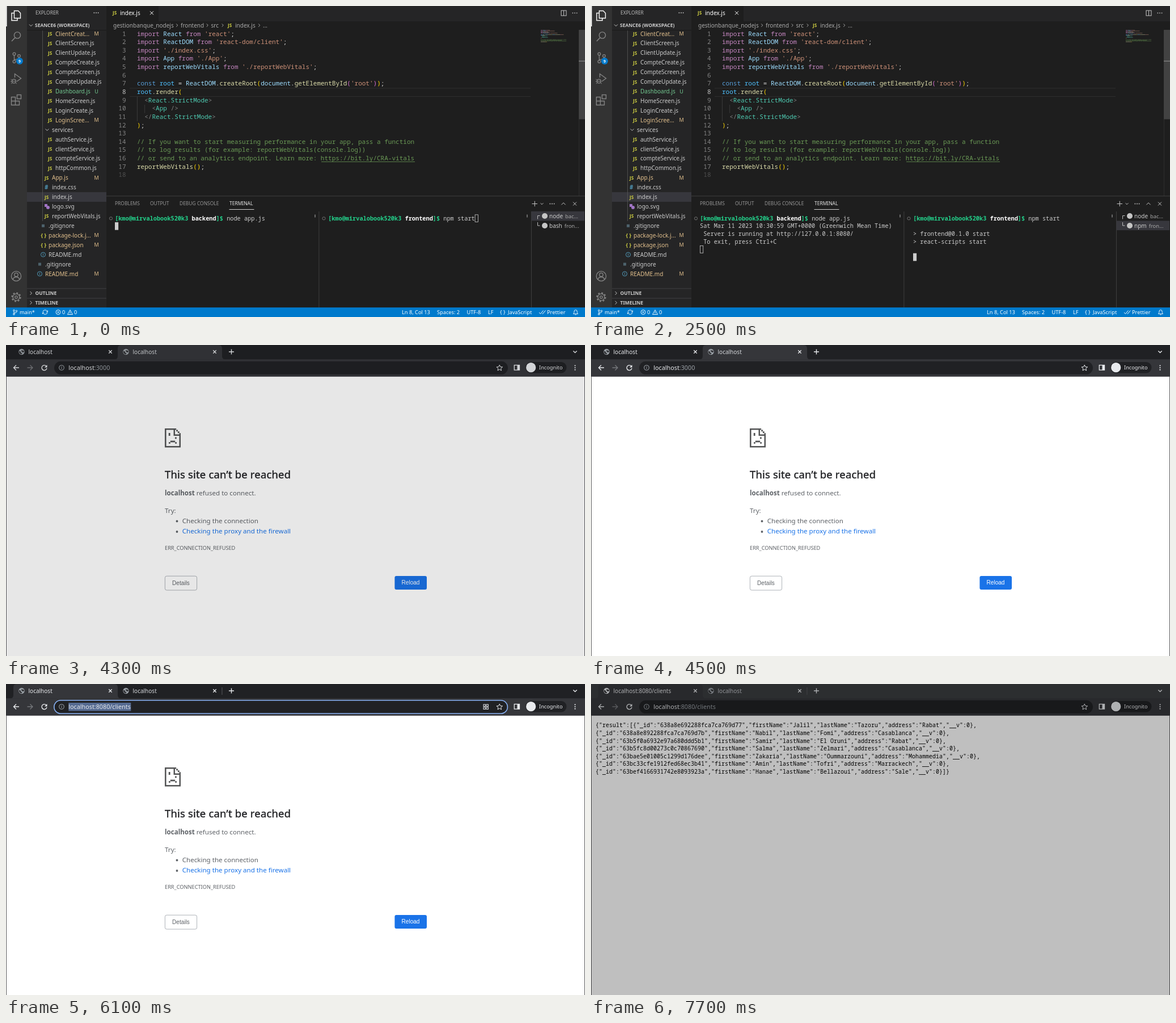
An HTML page for the animation above (8 s loop, 1021 px wide and 548 px high).

```html
<!DOCTYPE html>
<html lang="en">
<head>
<meta charset="utf-8">
<title>Starting backend and frontend</title>
<style>
html, body { margin: 0; width: 100%; height: 100%; overflow: hidden; background: #1e1e1e; }
svg { display: block; width: 1021px; height: 548px; font-family: "Noto Sans", sans-serif; }
text { white-space: pre; }
.mono { font-family: "Noto Sans Mono", monospace; }
.sans { font-family: "Liberation Sans", Arial, sans-serif; }
.b { font-weight: 700; }
.medium { stroke: #202124; stroke-width: .4px; letter-spacing: .2px; }
.mid { text-anchor: middle; }
.end { text-anchor: end; }
</style>
</head>
<body>
<svg id="stage" viewBox="0 0 1021 548" xmlns="http://www.w3.org/2000/svg"></svg>
<script>
const LOOP = 8000;
const GREY = '#cccccc', DIM = '#858585', ICON = '#c5c5c5';

// drawing helpers
const esc = s => s.replace(/&/g, '&amp;').replace(/</g, '&lt;').replace(/>/g, '&gt;');
const span = (s, fill, more = '') => `<tspan fill="${fill}" ${more}>${esc(s)}</tspan>`;
const rawText = (x, y, inner, fill, size, cls = '') =>
  `<text x="${x}" y="${y}" fill="${fill}" font-size="${size}" class="${cls}">${inner}</text>`;
const text = (x, y, s, fill = GREY, size = 10, cls = '') => rawText(x, y, esc(s), fill, size, cls);
const rect = (x, y, w, h, fill, more = '') =>
  `<rect x="${x}" y="${y}" width="${w}" height="${h}" fill="${fill}" ${more}/>`;
const path = (d, stroke = ICON, w = 1, more = '') =>
  `<path d="${d}" fill="none" stroke="${stroke}" stroke-width="${w}" ${more}/>`;
const shape = (d, fill) => `<path d="${d}" fill="${fill}"/>`;
const disc = (x, y, r, fill) => `<circle cx="${x}" cy="${y}" r="${r}" fill="${fill}"/>`;
const ring = (x, y, r, stroke = ICON, w = 1, more = '') =>
  `<circle cx="${x}" cy="${y}" r="${r}" fill="none" stroke="${stroke}" stroke-width="${w}" ${more}/>`;
const cross = (x, y, r, c = ICON, w = 1) =>
  path(`M${x - r} ${y - r}l${2 * r} ${2 * r}m0 ${-2 * r}l${-2 * r} ${2 * r}`, c, w);
const chevron = (x, y, turn, c = ICON, r = 3, w = 1) =>
  path(`M${-r} ${-r / 2}L0 ${r / 2}L${r} ${-r / 2}`, c, w, `transform="translate(${x} ${y}) rotate(${turn})"`);
const dots = (x, y, dx, dy, c = ICON, r = 0.9) =>
  [-1, 0, 1].map(i => disc(x + i * dx, y + i * dy, r, c)).join('');
const info = (x, y, r, c, w = 1) => ring(x, y, r, c, w)
  + path(`M${x} ${y - 0.6}v${r * 0.6}M${x} ${y - r * 0.55}v${r * 0.25}`, c, w);
const during = (from, to, ...parts) => `<g data-from="${from}" data-to="${to}">${parts.join('')}</g>`;

// ---------- editor window ----------
const INK = {
  k: '#c586c0', b: '#569cd6', v: '#9cdcfe', s: '#ce9178', f: '#dcdcaa', o: '#4fc1ff', t: '#4ec9b0',
  p: '#808080', w: '#d4d4d4', g: '#ffd700', m: '#da70d6', c: '#6a9955'
};
// each ~x switches to ink x
const CODE = [
  "~kimport ~vReact ~kfrom ~s'react'~w;",
  "~kimport ~vReactDOM ~kfrom ~s'react-dom/client'~w;",
  "~kimport ~s'./index.css'~w;",
  "~kimport ~vApp ~kfrom ~s'./App'~w;",
  "~kimport ~vreportWebVitals ~kfrom ~s'./reportWebVitals'~w;",
  "",
  "~bconst ~oroot ~w= ~vReactDOM~w.~fcreateRoot~g(~vdocument~w.~fgetElementById~m(~s'root'~m)~g)~w;",
  "~oroot~w.~frender~g(",
  "~w  ~p<~tReact.StrictMode~p>",
  "~w    ~p<~tApp ~p/>",
  "~w  ~p</~tReact.StrictMode~p>",
  "~g)~w;",
  "",
  "~c// If you want to start measuring performance in your app, pass a function",
  "~c// to log results (for example: reportWebVitals(console.log))",
  "~c// or send to an analytics endpoint. Learn more: https://bit.ly/CRA-vitals",
  "~freportWebVitals~g()~w;",
  ""
].map(s => s.split('~').slice(1).map(p => [INK[p[0]], p.slice(1)]));

const FILES = [
  [87, 'js', 'ClientCreat...', 'M'], [87, 'js', 'ClientScreen.js'], [87, 'js', 'ClientUpdate.js'],
  [87, 'js', 'CompteCreate.js'], [87, 'js', 'CompteScreen.js'], [87, 'js', 'CompteUpdate.js'],
  [87, 'js', 'Dashboard.js', 'U'], [87, 'js', 'HomeScreen.js'], [87, 'js', 'LoginCreate.js'],
  [87, 'js', 'LoginScree...', 'M'], [81, 'dir', 'services'], [87, 'js', 'authService.js'],
  [87, 'js', 'clientService.js'], [87, 'js', 'compteService.js'], [87, 'js', 'httpCommon.js'],
  [81, 'js', 'App.js', 'M'], [81, 'css', 'index.css'], [81, 'js', 'index.js'], [81, 'svg', 'logo.svg'],
  [81, 'js', 'reportWebVitals.js'], [75, 'git', '.gitignore'], [75, 'json', 'package-lock.j...', 'M'],
  [75, 'json', 'package.json', 'M'], [75, 'info', 'README.md'], [69, 'git', '.gitignore'],
  [69, 'info', 'README.md', 'M']
];
const jsIcon = (x, y) => text(x, y + 3, 'JS', '#cbcb41', 8.3, 'b');
const FILE_ICON = {
  js: jsIcon,
  dir: (x, y) => chevron(x + 4.5, y, 0),
  css: (x, y) => text(x, y + 3.6, '#', '#519aba', 10, 'b'),
  json: (x, y) => text(x - 0.5, y + 3, '{ }', '#cbcb41', 9, 'b'),
  info: (x, y) => info(x + 3.5, y, 4, '#519aba'),
  git: (x, y) => rect(x + 1, y - 2.5, 5, 5, '#4d626c'),
  svg: (x, y) => rect(x, y - 4.5, 5, 5, '#a074c4') + disc(x + 6, y + 1.5, 3, '#a074c4')
};
const STATUS_INK = { M: '#e2c08d', U: '#73c991' };

function activityBar() {
  return rect(0, 0, 37, 532, '#333333') + rect(0, 0, 1.5, 36, '#fff')
    + path('M14.5 8.5h7l4 4v9h-11zM14.5 12.5h-4.5v13h10v-4', '#fff', 1.4)
    + ring(20, 51.5, 5.6, DIM, 1.4) + path('M16 55.7L10 62', DIM, 1.6)
    + ring(14.5, 84.5, 2.3, DIM, 1.3) + ring(23, 88, 2.3, DIM, 1.3) + ring(14.5, 98, 2.3, DIM, 1.3)
    + path('M14.5 87v8.6M23 90.5q-.5 3.5-8 4', DIM, 1.3)
    + disc(24, 97, 6, '#007acc') + text(24, 99.6, '9', '#fff', 7, 'b mid')
    + path('M15.5 126v-6.5L26.5 127.5L19 133', DIM, 1.4) + ring(14, 132.5, 3.4, DIM, 1.3)
    + path('M8.5 129l3 2M8 133h3M9 137l2.5-2M19 137l-2.5-2M10.5 132.5h7', DIM, 1)
    + path('M9.5 160.5h7v14h-7zM9.5 167.5h14v7h-14z', DIM, 1.4)
    + rect(19.5, 156.5, 7, 7, 'none', `stroke="${DIM}" stroke-width="1.4"`)
    + ring(18, 476, 8.6, DIM, 1.3) + ring(18, 473.5, 3.2, DIM, 1.3)
    + path('M12 482q1.5-4.5 6-4.5t6 4.5', DIM, 1.3)
    + ring(18, 513, 5.8, DIM, 1.3) + ring(18, 513, 2.2, DIM, 1.3)
    + ring(18, 513, 7.5, DIM, 2.2, 'stroke-dasharray="2.9 2.99"');
}

function sidebar() {
  const rows = FILES.map(([x, icon, name, mark], i) => {
    const y = 48.9 + i * 16.92;
    const ink = STATUS_INK[mark] || GREY;
    return FILE_ICON[icon](x - 13, y) + text(x, y + 3.6, name, ink)
      + (mark ? text(159.5, y + 3.2, mark, ink, 9, 'mid') : '');
  }).join('');
  return rect(37, 0, 140, 532, '#252526') + rect(37, 328, 140, 17, '#37373d')
    + rect(64, 42, 0.8, 337, '#585858') + rows
    + text(52, 15, 'EXPLORER', '#bbbbbb', 8.46) + dots(159, 12, 3.6, 0)
    + chevron(44, 34, 0) + text(51, 37.1, 'SEANCE6 (WORKSPACE)', GREY, 8.46, 'b')
    + rect(37, 42, 140, 1.2, '#1b1b1c')
    + rect(37, 497.5, 140, 0.8, '#48484a') + rect(37, 514.6, 140, 0.8, '#48484a')
    + chevron(44, 506, -90) + text(51.5, 509.2, 'OUTLINE', GREY, 8.46, 'b')
    + chevron(44, 522.8, -90) + text(51.5, 526, 'TIMELINE', GREY, 8.46, 'b');
}

function editor() {
  const lineH = 14.63, faint = '#a9a9a9';
  let out = rect(177, 0, 844, 27, '#252526') + rect(177, 0, 92, 27, '#1e1e1e')
    + jsIcon(188, 12) + text(201, 15.6, 'index.js', '#fff') + cross(257, 12.3, 3, '#fff')
    + rect(979, 8, 9, 9, 'none', `stroke="${ICON}"`) + path('M983.5 8v9') + dots(1003, 12.3, 3.6, 0)
    + text(189, 37.6, 'gestionbanque_nodejs', faint) + chevron(301.5, 34, -90, faint, 2.6)
    + text(308, 37.6, 'frontend', faint) + chevron(355, 34, -90, faint, 2.6)
    + text(361.5, 37.6, 'src', faint) + chevron(382, 34, -90, faint, 2.6)
    + jsIcon(391, 34) + text(404, 37.6, 'index.js', faint) + chevron(446.5, 34, -90, faint, 2.6)
    + text(453, 37.6, '...', faint)
    + rect(218, 144.5, 707, 0.9, '#303030') + rect(218, 159, 707, 0.9, '#303030')
    + rect(231, 159.5, 0.8, 43.5, '#404040') + rect(244.3, 174, 0.8, 14.6, '#404040')
    + rect(556, 274, 165, 0.8, INK.c);
  CODE.forEach((tokens, i) => {
    const y = +(52.6 + i * lineH).toFixed(2);
    const ink = i === 7 ? '#c6c6c6' : i === 17 ? '#505050' : DIM;
    out += text(211.5, y, String(i + 1), ink, 11.03, 'mono end');
    out += rawText(231, y, tokens.map(([c, s]) => span(s, c)).join(''), GREY, 11.03, 'mono');
    let col = 0;
    for (const [c, s] of tokens) {
      for (const word of s.matchAll(/\S+/g))
        out += rect(943 + (col + word.index) * 0.61, 42.3 + i * 1.27, word[0].length * 0.61, 0.9, c, 'opacity=".5"');
      col += s.length;
    }
  });
  return out + rect(1010, 42, 0.7, 293, '#343434')
    + during(0, 4100, rect(1010, 42, 11, 157.5, '#424242'))
    + rect(1010, 96.5, 11, 1.2, '#8c8c8c');
}

const CELL = 6.16, TERM = 10.27, ROW = 13.65;
const termLine = (x, row, s) => text(x, 377.6 + row * ROW, s, GREY, TERM, 'mono');
const prompt = (x, dir, cmd) => rawText(x, 377.6,
  span('[kmo@mirvalobook520k3 ', '#23d18b', 'class="b"') + span(dir, '#ffffff', 'class="b"')
  + span(']$', '#23d18b', 'class="b"') + span(' ' + cmd, GREY), GREY, TERM, 'mono');
function cursor(x, col, row, solid) {
  const left = x + col * CELL, top = 367.4 + row * ROW;
  return solid ? rect(left, top, CELL, 13.6, GREY)
    : rect(left + 0.4, top + 0.4, CELL - 0.8, 12.8, 'none', `stroke="${GREY}" stroke-width=".8"`);
}
const termTab = (y, name, where) => disc(950, y, 5, ICON)
  + rawText(958, y + 3.6, esc(name) + span(where, '#a8a8a8', 'dx="4" font-size="9.4"'), GREY, 10);

function panel() {
  const L = 192, R = 568, faint = '#969696';
  const row = (from, to, y) => during(from, to, rect(926.5, y, 93.5, 16.6, '#37373d'));
  return rect(177, 334.5, 844, 0.8, '#474747')
    + text(192, 351.2, 'PROBLEMS', faint, 8.46) + text(254, 351.2, 'OUTPUT', faint, 8.46)
    + text(306, 351.2, 'DEBUG CONSOLE', faint, 8.46) + text(394, 351.2, 'TERMINAL', '#e7e7e7', 8.46)
    + rect(393.5, 358, 44, 0.9, '#e7e7e7')
    + path('M927.5 348.5h9.5M932.3 343.7v9.5') + chevron(945, 348.5, 0, ICON, 2.4)
    + dots(963, 348.5, 3.6, 0) + chevron(983, 348.5, 180, ICON, 3.6) + cross(1003, 348.5, 3)
    + rect(551.5, 362, 0.8, 169, '#474747') + rect(926, 362, 0.8, 169, '#474747')
    + rect(544, 367.5, 2, 5, '#6a6a6a') + rect(918, 367.5, 2, 5, '#6a6a6a')
    + ring(185, 374.3, 2.6, '#7a7a7a', 0.9) + ring(560.5, 374.3, 2.6, '#7a7a7a', 0.9)
    + prompt(L, 'backend', 'node app.js') + prompt(R, 'frontend', 'npm start')
    + during(0, 1100, cursor(L, 0, 1, true))
    + during(1100, LOOP,
      termLine(L, 1, 'Sat Mar 11 2023 10:30:59 GMT+0000 (Greenwich Mean Time)'),
      termLine(L, 2, ' Server is running at http://127.0.0.1:8080/'),
      termLine(L, 3, ' To exit, press Ctrl+C'))
    + during(1100, 1300, cursor(L, 0, 4, true)) + during(1300, LOOP, cursor(L, 0, 4, false))
    + during(0, 1300, cursor(R, 42, 0, false)) + during(1300, 1900, cursor(R, 42, 0, true))
    + during(1900, 2500, cursor(R, 0, 1, true))
    + during(2500, LOOP, termLine(R, 2, '> frontend@0.1.0 start'),
      termLine(R, 3, '> react-scripts start'), cursor(R, 0, 5, true))
    + row(0, 1300, 361.8) + row(1300, LOOP, 378.5)
    + path('M937.5 375.5v-6h4M937.5 381v6h4', GREY, 0.9)
    + termTab(370, 'node', 'bac...')
    + during(0, 1900, termTab(387, 'bash', 'fron...'))
    + during(1900, 2100, termTab(387, 'node', 'fron...'))
    + during(2100, LOOP, termTab(387, 'npm', 'fron...'));
}

function statusBar() {
  const w = '#fff', label = (x, s) => text(x, 542.6, s, w, 9.23);
  return rect(0, 531.2, 1021, 16.8, '#007acc')
    + ring(14, 536.5, 1.3, w, 0.9) + ring(14, 543, 1.3, w, 0.9) + ring(18.5, 537.5, 1.3, w, 0.9)
    + path('M14 538v4M18.5 539q0 2-4.5 2', w, 0.9) + label(24, 'main*')
    + path('M65 539a4 4 0 0 1 7.6-1M73 540a4 4 0 0 1-7.6 1M73.5 536.5v2.5h-2.5M64.5 542.8v-2.5h2.5', w, 0.9)
    + ring(92, 539.5, 4, w, 0.9) + cross(92, 539.5, 1.7, w, 0.9) + label(99, '0')
    + path('M113 535.5l4.5 8h-9zM113 538.5v2.5M113 541.8v.8', w, 0.9) + label(120, '0')
    + label(698, 'Ln 8, Col 13') + label(760, 'Spaces: 2') + label(812.5, 'UTF-8') + label(850, 'LF')
    + text(871, 542.8, '{', w, 9.5) + text(877, 542.8, '}', w, 9.5) + label(885, 'JavaScript')
    + path('M940 540l2.5 2.5 5-6M945.5 542l.8.5 5-6', w, 1) + label(954, 'Prettier')
    + path('M1000.5 542.5q1.5-1.5 1.5-4.5a2.5 2.5 0 0 1 5 0q0 3 1.5 4.5zM1003.5 544h2', w, 0.9);
}

// ---------- browser window ----------
const CLIENTS = [
  ['638a8e692288fca7ca769d77', 'Jalil', 'Tazoru', 'Rabat'],
  ['638a8e892288fca7ca769d7b', 'Nabil', 'Fomi', 'Casablanca'],
  ['63b5f0a6932e97a680ddd5b1', 'Samir', 'El Oruni', 'Rabat'],
  ['63b5fc8d00273c0c70867690', 'Salma', 'Zelmari', 'Casablanca'],
  ['63bae5e01005c1299d176dee', 'Zakaria', 'Oummarzouni', 'Mohammedia'],
  ['63bc33cfe1912fed68ec3b41', 'Amin', 'Tofri', 'Marrackech'],
  ['63bef4166931742e8093923a', 'Hanae', 'Bellazoui', 'Sale']
];
const LIGHT = '#e8eaed', MUTED = '#9aa0a6';

const globe = (x, c) => disc(x, 12, 5.2, c)
  + shape(`M${x - 4} 10.5q2 0 2.5 2t2 1.5-1 2.5q-3.5-1-4-4zM${x} 8.5q1 2 3.5 1l1 2.5q-2 2-3 .5t-2-1z`, '#303134');
const tabShape = x => shape(`M${x - 6} 25.5q6 0 6-6V6q0-6 6-6h172q6 0 6 6v13.5q0 6 6 6z`, '#35363a');
const tabLabel = (x, s, c = LIGHT) => text(x, 15.6, s, c);

function tabStrip() {
  return rect(0, 0, 1021, 26, '#202124') + during(7700, LOOP, rect(0, 0, 1021, 26, '#3b3d40'))
    + during(4300, 5700, tabShape(197))
    + during(5700, LOOP, tabShape(13), rect(380.5, 6, 0.9, 13, '#5a5c60'))
    + during(4300, 6600, globe(27.5, MUTED)) + during(6600, LOOP, globe(27.5, LIGHT)) + globe(211.5, MUTED)
    + during(4300, 6500, tabLabel(39.5, 'localhost'))
    + during(6500, LOOP, tabLabel(39.5, 'localhost:8080/clients'))
    + during(4300, 7500, tabLabel(223.5, 'localhost', '#d5d8dc'))
    + during(7500, LOOP, tabLabel(223.5, 'localhost', '#c0c3c8'))
    + cross(184, 12, 2.7, LIGHT, 1.3) + cross(368, 12, 2.7, LIGHT, 1.3)
    + path('M393 12h9M397.5 7.5v9', LIGHT, 1.4) + chevron(1003.5, 12, 0, LIGHT, 3.2, 1.4);
}

const url = (host, rest) => rawText(110.3, 43.7, span(host, LIGHT) + span(rest, MUTED), LIGHT, 10.77);
const omnibox = (fill, more = '') => rect(85, 28.8, 800, 23, fill, `rx="11.5" ${more}`);
const hover = (from, to, a) => during(from, to, omnibox('#fff', `opacity="${a}"`));

function toolbar() {
  const tiles = [[842, 36], [847, 36], [842, 41], [847, 41]]
    .map(([x, y]) => rect(x, y, 3.4, 3.4, 'none', `stroke="${LIGHT}"`)).join('');
  return rect(0, 25.2, 1021, 30.2, '#35363a') + rect(0, 55, 1021, 0.8, '#4b4c50')
    + path('M23 40h-9.5M18 35.5l-4.5 4.5 4.5 4.5', LIGHT, 1.3)
    + path('M37.5 40h9.5M42.5 35.5l4.5 4.5-4.5 4.5', '#76787c', 1.3)
    + path('M71 37.2a4.5 4.5 0 1 0 1 3.8', LIGHT, 1.4) + shape('M72.5 35v4.5h-4.5z', LIGHT)
    + omnibox('#202124')
    + hover(5300, 5400, 0.01) + hover(5400, 5500, 0.02) + hover(5500, 5700, 0.03) + hover(5900, 6100, 0.03)
    + info(98, 40, 4.3, MUTED, 1.1)
    + during(4300, 5700, url('localhost', ':3000'))
    + during(5700, 6100, url('localhost', ':8080/clients'))
    + during(6100, 6400,
      rect(84.8, 28.8, 799.6, 23.2, 'none', 'rx="11.6" stroke="#8ab4f8" stroke-width="1.6"'),
      rect(110.3, 33, 110, 14.5, '#566b92'), url('localhost:8080/clients', ''), tiles)
    + during(6400, LOOP, url('localhost', ':8080/clients'))
    + path('M870.3 35l1.5 3.5 3.8.3-2.9 2.5.9 3.7-3.3-2-3.3 2 .9-3.7-2.9-2.5 3.8-.3z', LIGHT, 1)
    + rect(896.3, 35.5, 9.2, 8.6, 'none', `stroke="${LIGHT}" stroke-width="1.3"`) + rect(901.5, 35.5, 4, 8.6, LIGHT)
    + rect(916, 30, 72.5, 19.5, '#202124', 'rx="9.7"') + disc(925.7, 39.7, 8.6, LIGHT)
    + text(940, 43, 'Incognito', LIGHT, 9.23) + dots(1003.5, 40, 0, 3.7, LIGHT, 1.1);
}

function errorPage() {
  const ink = '#5f6368', dark = '#535455', body = 11.58;
  const sad = path('M300.2 148.3H281.3V179.3H306.8V155.2M296.8 147V158.7H308', dark, 2.5)
    + rect(300.2, 149.5, 2.8, 2.8, dark) + rect(302.9, 152.3, 2.8, 2.9, dark)
    + rect(286.8, 155, 2.8, 5, dark) + rect(298, 162.5, 2.8, 2.8, dark)
    + rect(289.8, 168.6, 8.4, 2.8, dark) + rect(287, 171.2, 2.8, 2.6, dark) + rect(298.2, 171.2, 2.8, 2.6, dark);
  return sad
    + text(280, 235, 'This site can’t be reached', '#202124', 18.46, 'medium')
    + rawText(280, 265.4, span('localhost', ink, 'class="b"') + ' refused to connect.', ink, body)
    + text(280, 296, 'Try:', ink, body)
    + disc(301.5, 310.5, 1.9, ink) + text(310.7, 314, 'Checking the connection', ink, body)
    + disc(301.5, 329, 1.9, ink) + text(310.7, 332.4, 'Checking the proxy and the firewall', '#1a73e8', body)
    + text(280, 361.3, 'ERR_CONNECTION_REFUSED', ink, 9.23)
    + rect(280.4, 407.2, 56.2, 24.8, 'none', `rx="3" stroke="${MUTED}" stroke-width=".8"`)
    + text(308.5, 422.7, 'Details', ink, 10.1, 'sans mid')
    + rect(685.4, 407, 56.6, 24, '#1a73e8', 'rx="3"') + text(713.5, 422.2, 'Reload', '#fff', 10.1, 'sans mid');
}

function clientsPage() {
  const last = CLIENTS.length - 1;
  return CLIENTS.map(([_id, firstName, lastName, address], i) => {
    const json = JSON.stringify({ _id, firstName, lastName, address, __v: 0 });
    return text(8, 76.4 + i * 13.55, (i ? '' : '{"result":[') + json + (i < last ? ',' : ']}'), '#000', 10, 'mono');
  }).join('');
}

function browser() {
  return rect(0, 0, 1021, 548, '#2b2c2f') + rect(0.77, 55, 1019.46, 493, '#fff')
    + tabStrip() + toolbar()
    + during(4300, 6500, errorPage()) + during(6500, LOOP, clientsPage())
    + during(4300, 4500, rect(0, 0, 1021, 548, '#000', 'opacity=".095"'))
    + during(7700, LOOP, rect(0, 0, 1021, 548, '#000', 'opacity=".25"'));
}

const stage = document.getElementById('stage');
stage.innerHTML = during(0, 4300, rect(0, 0, 1021, 548, '#1e1e1e'),
  activityBar(), sidebar(), editor(), panel(), statusBar()) + during(4300, LOOP, browser());

const timed = [...stage.querySelectorAll('[data-from]')]
  .map(el => ({ el, from: +el.dataset.from, to: +el.dataset.to }));
const start = performance.now();
function tick() {
  const t = (performance.now() - start) % LOOP;
  for (const { el, from, to } of timed) el.style.display = t >= from && t < to ? '' : 'none';
  requestAnimationFrame(tick);
}
tick();
</script>
</body>
</html>
```
